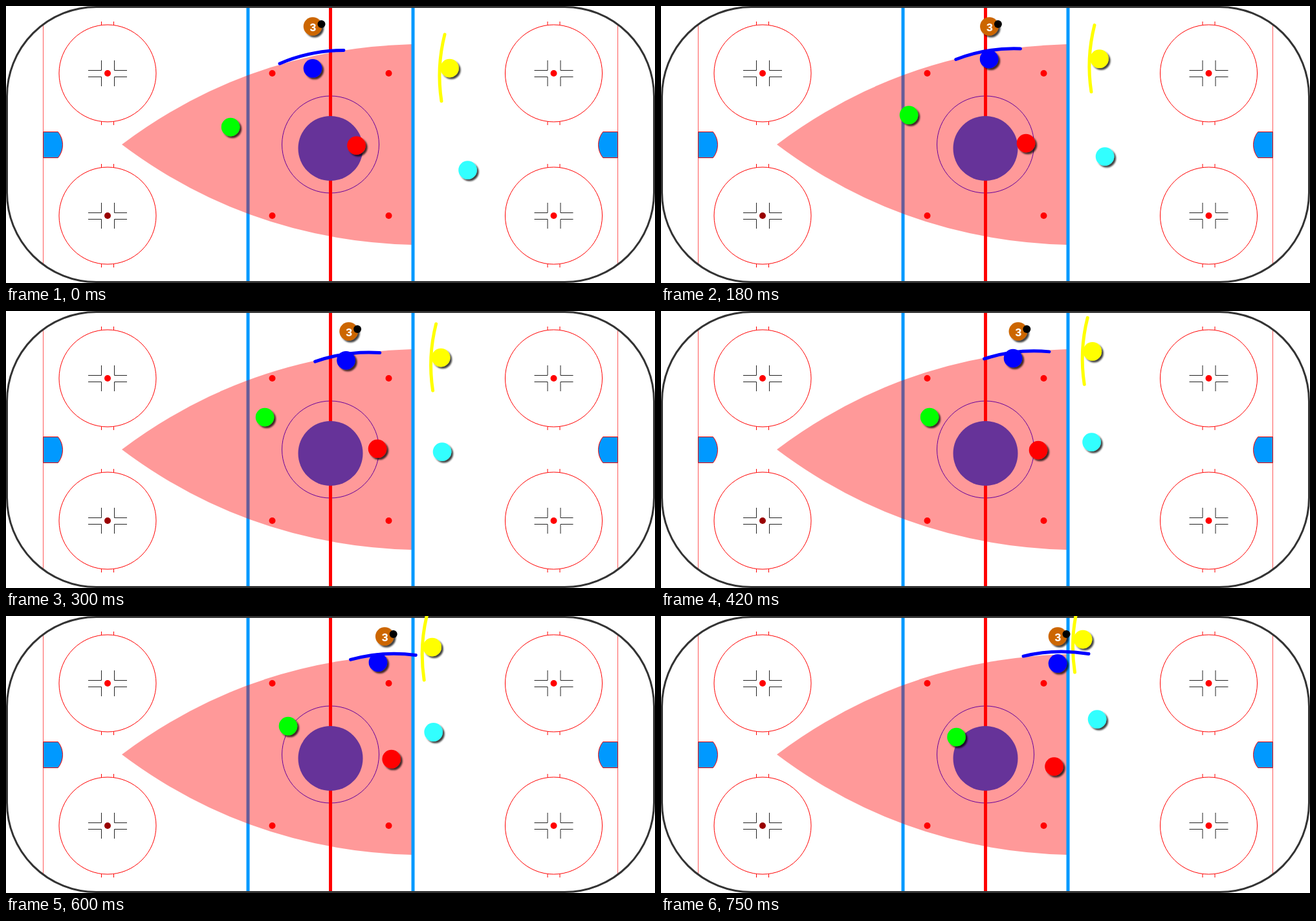
Write an HTML page that moves like this. It is 1003x428 px and loops after 2.1 s.

```html
<!DOCTYPE html>
<html lang="en">
<head>
<meta charset="utf-8">
<title>Rink drill</title>
<style>
html, body { margin: 0; width: 100%; height: 100%; overflow: hidden; background: #fff; }
svg { display: block; width: 1003px; height: 428px; }
text { font: 900 17px Roboto, "Liberation Sans", sans-serif; fill: #fff; text-anchor: middle; }
</style>
</head>
<body>
<svg viewBox="0 0 1003 428">
  <defs>
    <filter id="shadow" x="-30%" y="-30%" width="180%" height="180%">
      <feDropShadow dx="2.8" dy="2.8" stdDeviation="1.2" flood-color="#000" flood-opacity=".75"/>
    </filter>
    <g id="faceoff" fill="none">
      <circle r="75" stroke="#f00"/>
      <path stroke="#f00" d="M-9.5-80v5m19-5v5m-19 150v5m19-5v5"/>
      <path stroke="#222" d="M-9.5-20v15.5H-30M10.500-20v15.500H30M-9.500 20V5.500H-30M10.500 20V5.500H30"/>
    </g>
    <g id="end">
      <path d="M57.500 29V399" stroke="#f00" stroke-opacity=".65"/>
      <path d="M57.500 194.500H80.500Q87.500 203.500 87.500 214.500T80.500 234.500H57.500Z" fill="#09f" stroke="#f00"/>
    </g>
  </defs>

  <use href="#end"/>
  <use href="#end" transform="matrix(-1 0 0 1 1003 0)"/>
  <g id="spots"></g>
  <path d="M374 2V426" stroke="#09f" stroke-width="5"/>
  <circle cx="501.500" cy="214" r="75" fill="none" stroke="#00f"/>
  <path d="M179 214Q376 66 628 59V369Q376 362 179 214Z" fill="#f00" fill-opacity=".4"/>
  <path d="M629 2V426" stroke="#09f" stroke-width="5"/>
  <path d="M501.500 2V426" stroke="#f00" stroke-width="5"/>
  <circle cx="501.500" cy="220" r="50" fill="#639"/>
  <g id="dots"></g>
  <rect x="1.500" y="1.500" width="1000" height="425" rx="138" fill="none" stroke="#333" stroke-width="3"/>

  <g fill="none" stroke-width="5" stroke-linecap="round">
    <path id="yellowArc" d="M-7.500-52Q-20.500-.800-12.500 51" stroke="#ff0"/>
    <path id="blueArc" d="M-50.500 0Q0-10.400 50.500 0" stroke="#00f"/>
  </g>
  <g id="players"></g>
</svg>
<script>
const LOOP = 2100, STEP = 30, LAST = 25;
const byId = id => document.getElementById(id);

function add(parent, tag, attrs) {
  const el = document.createElementNS('http://www.w3.org/2000/svg', tag);
  for (const key in attrs) el.setAttribute(key, attrs[key]);
  return parent.appendChild(el);
}

// Static face-off spots
for (const y of [104, 324]) {
  for (const x of [157, 846.5]) {
    add(byId('spots'), 'use', { href: '#faceoff', x, y });
    add(byId('dots'), 'circle', { cx: x, cy: y, r: 5, fill: x < 200 && y > 200 ? '#900' : '#f00' });
  }
  for (const x of [411.5, 591.5])
    add(byId('dots'), 'circle', { cx: x, cy: y, r: 5, fill: '#f00' });
}

// Curved routes pass through one point per key; straight routes have two ends
const KEYS = [0, 6, 10, 14, 17, 22, 25];
const ROUTES = {
  '#ff0': [[685.5, 96], [652, 36]],
  '#3ff': [[713.5, 253.5], [686, 232.5], [674, 217.5], [665.5, 202.5], [662, 191], [663, 171.5], [674, 159.5]],
  '#f00': [[541.5, 215.5], [564, 212], [574, 212.8], [583, 215], [589.5, 217.7], [600, 224.5], [607.5, 232.5]],
  '#0f0': [[347, 187], [383, 168.5], [400, 164], [415, 164], [425.5, 166], [443.5, 175], [456.5, 187]],
  '#00f': [[474, 96.3], [507, 82], [525.5, 76.2], [544, 73], [558.7, 72], [588, 72], [613, 73.3]],
  '#c60': [[474, 31.5], [613, 31.5]]
};

const players = Object.entries(ROUTES).map(([fill, route]) => {
  const group = add(byId('players'), 'g', {});
  add(group, 'circle', { r: 14.3, fill, filter: 'url(#shadow)' });
  if (fill === '#c60') {
    add(group, 'text', { x: .5, y: 7.5 }).textContent = '3';
    add(group, 'circle', { cx: 13.5, cy: -3.5, r: 6, fill: '#000' });
  }
  return { group, fill, route };
});

const mix = (a, b, u) => a + (b - a) * u;

// Smooth cubic curve through the keyed values
function spline(values, s) {
  const n = values.length - 1;
  const slope = i => (values[i + 1] - values[i]) / (KEYS[i + 1] - KEYS[i]);
  const tangent = i => {
    if (i === 0) return 2 * slope(0) - tangent(1);
    if (i === n) return 2 * slope(n - 1) - tangent(n - 1);
    const before = KEYS[i] - KEYS[i - 1], after = KEYS[i + 1] - KEYS[i];
    return (slope(i - 1) * after + slope(i) * before) / (before + after);
  };
  let i = 0;
  while (i < n - 1 && s > KEYS[i + 1]) i++;
  const h = KEYS[i + 1] - KEYS[i], u = (s - KEYS[i]) / h, v = 1 - u;
  return values[i] * v * v * (1 + 2 * u) + values[i + 1] * u * u * (3 - 2 * u)
    + h * u * v * (tangent(i) * v - tangent(i + 1) * u);
}

function position(route, s) {
  return [0, 1].map(axis => route.length === 2
    ? mix(route[0][axis], route[1][axis], s / LAST)
    : spline(route.map(p => p[axis]), s));
}

const place = (el, x, y, angle = 0) =>
  el.setAttribute('transform', `translate(${x} ${y}) rotate(${angle})`);

function draw(time) {
  const s = Math.min(LAST, Math.floor(time % LOOP / STEP)), u = s / LAST;
  for (const { group, fill, route } of players) {
    const [x, y] = position(route, s);
    place(group, x, y);
    if (fill === '#ff0') place(byId('yellowArc'), x, y);
  }
  place(byId('blueArc'), mix(472.5, 610.5, u), mix(78.7, 60.3, u), mix(-11.7, -2, u));
}

const start = performance.now();
function tick() {
  draw(performance.now() - start);
  requestAnimationFrame(tick);
}
tick();
</script>
</body>
</html>
```
